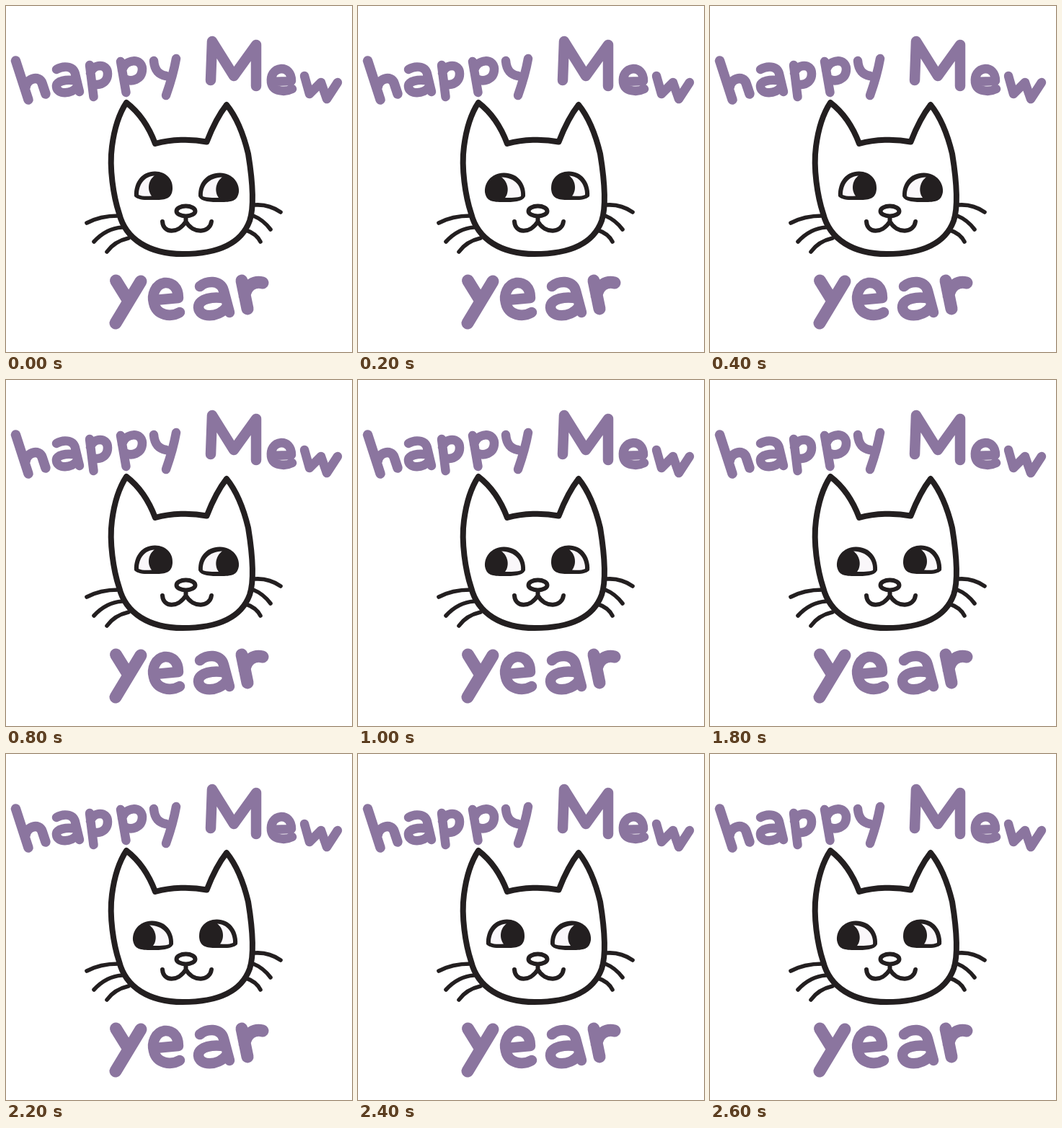
Write an HTML page that moves like this. It is 480x480 px and loops after 2.8 s.

```html
<!DOCTYPE html>
<html lang="en">
<head>
<meta charset="utf-8">
<title>happy Mew year</title>
<style>
  html, body { margin: 0; width: 100%; height: 100%; overflow: hidden; background: #fff; }
  svg { display: block; width: 100vw; height: 100vh; }
  .line { fill: none; stroke-linecap: round; stroke-linejoin: round; }
  .words { stroke: #8b759f; stroke-width: 12.5; }
  .bold { stroke-width: 14.5; }
  .big { stroke-width: 17; }
  .ink { stroke: #231f20; stroke-width: 8; }
  .thin { stroke-width: 6; }
  .whiskers { stroke-width: 5.6; }
  .black { fill: #231f20; }
  .white { fill: #faf7fa; }
  /* The second glance is the first one mirrored. */
  .eyes { transform-origin: 249.5px 0; animation: glance 400ms step-end infinite; }
  @keyframes glance {
    0% { transform: none; }
    50%, 100% { transform: scaleX(-1); }
  }
</style>
</head>
<body>
<svg viewBox="0 0 480 480" role="img" aria-label="happy Mew year">
  <g class="line words">
    <g id="happy">
      <path d="M13.500 76L31 130M27 113C29 100 46 96 50 107L55 122" stroke-width="13.500"/>
      <path d="M70 88C78 83 93 82 96 94L102 119M98 104C84 101 69 104 70 112C71 123 91 123 99 112"/>
      <path d="M116 82L121.500 126M117 93C121 80 141 79 141 94C141 109 125 112 119 106"/>
      <path d="M159 77L166.500 120M161 89C166 73 188 72 189 87C189 103 173 106 165 101"/>
      <path d="M205 76C206 88 211 95 222 97M236 73C233 90 228 107 222 124"/>
    </g>
    <g id="mew">
      <path class="bold" d="M284 103L286 49L316 97L347 54L347 111"/>
      <path d="M369 105L396 104C396 92 389 87 382 87C371 88 367 97 368 106C370 119 387 120 397 115"/>
      <path d="M414 97L421 122L437 106L445 129L460 106"/>
    </g>
    <g id="year" class="big">
      <path d="M152.500 381L168 406M187 382L152 440"/>
      <path class="bold" d="M207 408L239 405C239 390 230 383 220 384C207 386 202 401 205 412C209 430 229 432 241 425"/>
      <path class="bold" d="M269 389C277 381 298 379 302 395L310 425M305 406C288 402 267 406 267 418C268 433 294 433 306 418"/>
      <path d="M327 381L335 420M331 402C333 388 344 381 356 384"/>
    </g>
  </g>

  <g class="line ink">
    <path d="M167 134C157 149 150 172 147 195C143 225 149 264 157 288C166 324 199 344 245 344
             C291 344 326 331 338 298C345 277 342 242 336 205C329 176 319 153 306 137
             C295 151 286 169 278.500 188.500C256 184 229 185 207 191C198 167 184 147 167 134Z"/>
    <g class="whiskers">
      <path d="M112 301C125 294 141 291 156 291M122 327C133 315 146 308 161 307M140 341C147 331 157 325 170 322"/>
      <path d="M345 276C359 275 371 279 381 286M343 291C353 295 361 302 367 310M333 311C342 314 349 319 353 327"/>
    </g>
    <g class="thin">
      <ellipse cx="249.5" cy="284.5" rx="13" ry="7"/>
      <path d="M249.500 292V299M217 299C218 315 238 317 249.500 299C260 317 283 315 285 299"/>
    </g>
  </g>

  <g class="eyes">
    <path class="black" d="M178 264C177 243 190 229 207 229.500C222 230 232 240 231 254C230 267 222 269 207 269
                           C195 269 184 270 178 264Z"/>
    <path class="white" d="M184 262C184 248 192 236 206 235.500C198 241 195 254 202 263.500C195 264 188 264 184 262Z"/>
    <path class="black" d="M267 264C266 245 279 231 297 231.500C314 232 324 245 323 258C321 271 313 272 297 272
                           C284 272 271 272 267 264Z"/>
    <path class="white" d="M273 264C272 250 281 238 300 237.500C292 243 288 256 295 266C287 266 278 266 273 264Z"/>
  </g>
</svg>
</body>
</html>
```
